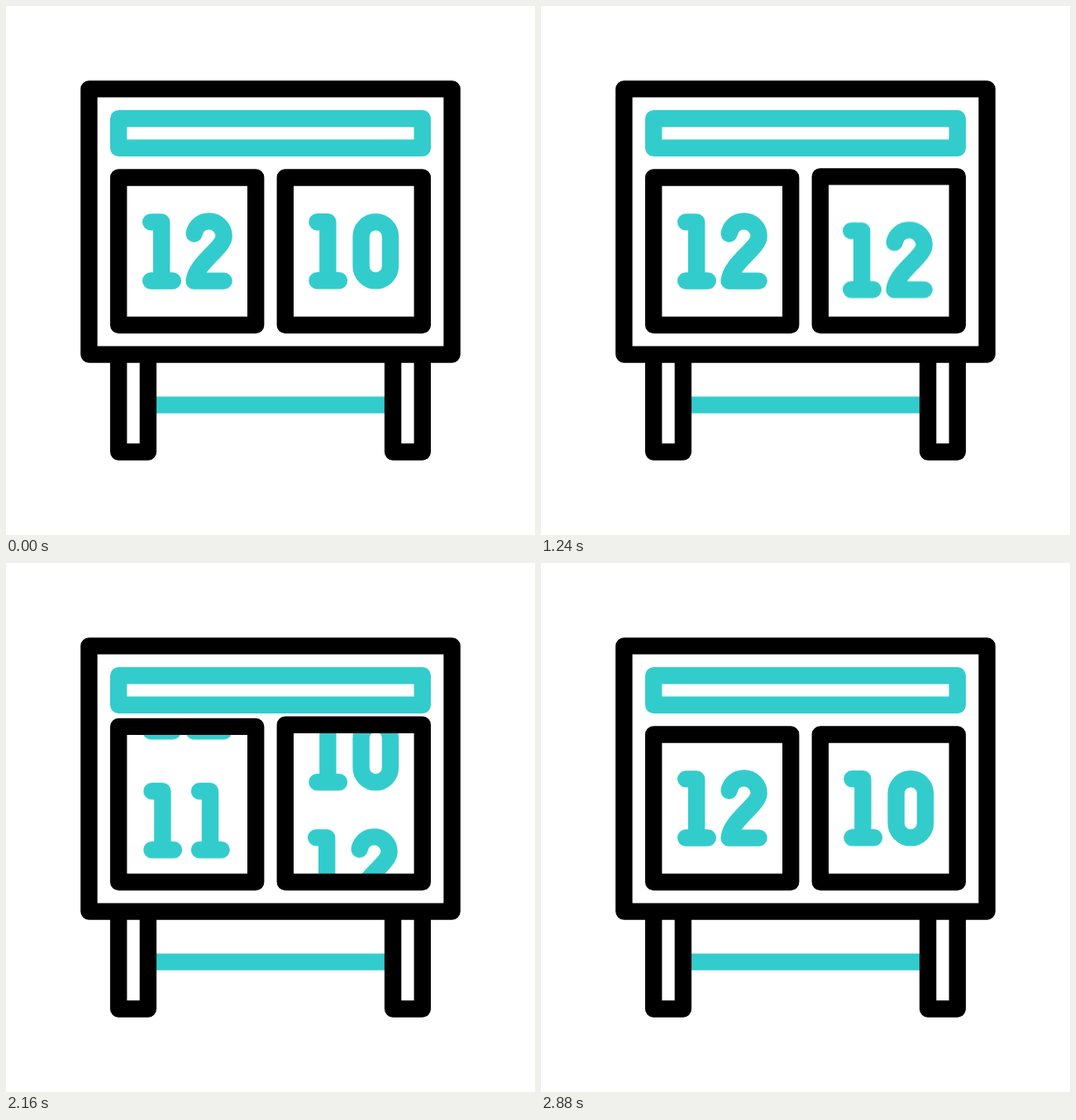
Animation, 640 px wide and 640 px high, one loop 3 s. Source, as an HTML page:

```html
<!DOCTYPE html>
<html lang="en">
<head>
<meta charset="utf-8">
<title>Scoreboard</title>
<style>
  html, body { margin: 0; width: 100%; height: 100%; overflow: hidden; background: #fff; }
  svg { display: block; width: 100vw; height: 100vh; }

  .line { fill: none; stroke: #000; stroke-width: 20.4; stroke-linecap: round; stroke-linejoin: round; }
  .teal { stroke: #33cccc; }
  .flat { stroke-linecap: butt; }

  .roll, .panel {
    animation: 3s cubic-bezier(.333, 0, .667, 1) infinite;
  }
  .panel { y: 207.5px; height: 178.5px; }
  .left.roll { animation-name: roll-left; }
  .right.roll { animation-name: roll-right; }
  .left.panel { animation-name: lift-left; }
  .right.panel { animation-name: lift-right; }

  /* Two single rolls, then a long spin; each winds up and overshoots. */
  @keyframes roll-right {
    0%, 6.667% { transform: translateY(0); }
    10.667% { transform: translateY(-12px); }
    16.533% { transform: translateY(152px); }
    18.667%, 32% { transform: translateY(138px); }
    36% { transform: translateY(126px); }
    41.867% { transform: translateY(290px); }
    44%, 56% { transform: translateY(276px); }
    61.867% { transform: translateY(260px); }
    76% { transform: translateY(880px); }
    93.333%, 100% { transform: translateY(828px); }
  }
  @keyframes roll-left {
    0%, 57.867% { transform: translateY(0); }
    63.667% { transform: translateY(-13px); }
    77.667% { transform: translateY(477px); }
    96%, 100% { transform: translateY(432px); }
  }

  /* The top edge of each panel rises while its number moves. */
  @keyframes lift-right {
    0%, 6.667%, 17.333%, 32%, 42.667%, 56%, 90%, 100% { y: 207.5px; height: 178.5px; }
    10.667%, 36%, 60%, 76% { y: 195.8px; height: 190.2px; }
  }
  @keyframes lift-left {
    0%, 57.867%, 92%, 100% { y: 207.5px; height: 178.5px; }
    62%, 77.333% { y: 197.9px; height: 188.1px; }
  }
</style>
</head>
<body>
<svg viewBox="0 0 640 640">
  <defs>
    <path id="one" d="M176.4 261.2H189.4V332.3M176.4 332.3H203"/>
    <g id="n10">
      <use href="#one"/>
      <rect x="229.6" y="261.2" width="35.4" height="71.2" rx="17.7"/>
    </g>
    <g id="n11">
      <use href="#one"/>
      <use href="#one" x="57.6"/>
    </g>
    <g id="n12">
      <use href="#one" x="-1.2" y=".2"/>
      <path d="M227.6 275.6C229.5 266 237 260.4 245.6 260.4A18 18 0 0 1 263.6 278.4C263.6 293 229.5 311 227.6 332.6H263.6"/>
    </g>
    <clipPath id="windows">
      <rect x="136" y="201" width="166" height="185"/>
      <rect x="338" y="201" width="166" height="185"/>
    </clipPath>
  </defs>

  <path class="line teal flat" d="M175 482.6H465"/>
  <g class="line">
    <path class="flat" d="M136.2 421.6V539.5H171.9V421.6M468.1 421.6V539.5H503.8V421.6"/>
    <rect x="100.4" y="100.4" width="439.2" height="321.2"/>
  </g>
  <rect class="line teal" x="136.2" y="136.2" width="367.6" height="35.6"/>

  <g class="line teal" clip-path="url(#windows)">
    <g class="left roll">
      <use href="#n12"/>
      <use href="#n10" y="-144"/>
      <use href="#n11" y="-288"/>
      <use href="#n12" y="-432"/>
    </g>
    <g class="right roll">
      <use href="#n10" x="200"/>
      <use href="#n11" x="200" y="-138"/>
      <use href="#n12" x="200" y="-276"/>
      <use href="#n10" x="200" y="-414"/>
      <use href="#n11" x="200" y="-552"/>
      <use href="#n12" x="200" y="-690"/>
      <use href="#n10" x="200" y="-828"/>
      <use href="#n11" x="200" y="-966"/>
    </g>
  </g>

  <rect class="line left panel" x="136.2" width="166"/>
  <rect class="line right panel" x="337.8" width="166"/>
</svg>
</body>
</html>
```
